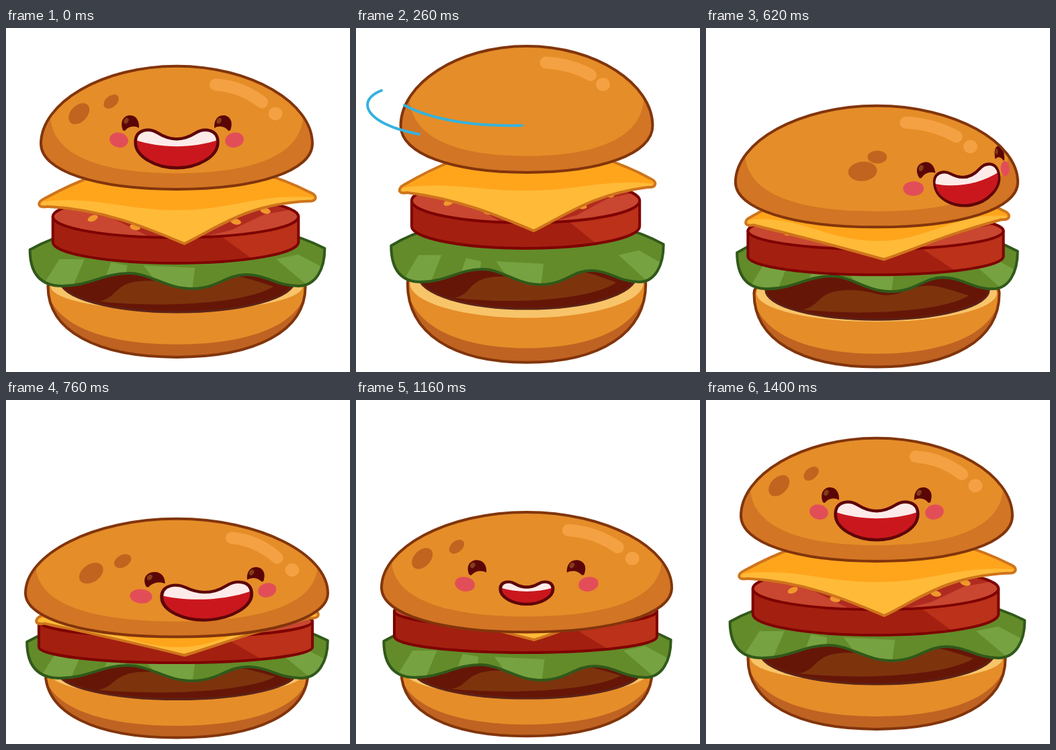
An HTML page with a canvas for the animation above (1.44 s loop, 512 by 512 pixels).

```html
<!DOCTYPE html>
<html lang="en">
<head>
<meta charset="utf-8">
<title>Bouncing burger</title>
<style>
  html, body { margin: 0; width: 100%; height: 100%; overflow: hidden; background: #fff; }
  canvas { display: block; }
</style>
</head>
<body>
<canvas id="stage" width="512" height="512"></canvas>
<script>
const ctx = document.getElementById('stage').getContext('2d');
const LOOP = 1440, STEPS = 42, RAD = Math.PI / 180;

// Key poses of the hop: step (30 per second), half width of the top bun,
// then the lowest point of each layer. All other sizes follow from these.
const FIELDS = ['step', 'spread', 'bun', 'cheese', 'tomato', 'lettuce'];
const POSES = [
  [0, 202, 240, 321, 350, 388],
  [8, 187.5, 215, 302, 328, 382],
  [14, 185.5, 215.5, 297, 334, 361],
  [23, 225, 352.5, 380, 391, 418],
  [30, 197, 320, 375, 386, 416],
  [35, 216, 345.5, 357, 376, 417],
  [37, 231, 353, 366, 385, 422]
].map(row => Object.fromEntries(FIELDS.map((f, i) => [f, row[i]])));

const clamp = (x, lo, hi) => Math.min(hi, Math.max(lo, x));

// Smooth cyclic spline through one field of the poses.
function sample(field, step) {
  const n = POSES.length;
  const pose = i => POSES[(i + n) % n];
  const time = i => pose(i).step + STEPS * Math.floor(i / n);
  const value = i => pose(i)[field];
  const tangent = i => (value(i + 1) - value(i - 1)) / (time(i + 1) - time(i - 1));
  const at = (step + STEPS) % STEPS;
  let i = n - 1;
  while (time(i) > at) i--;
  const span = time(i + 1) - time(i), u = (at - time(i)) / span, v = 1 - u;
  return value(i) * v * v * (1 + 2 * u) + value(i + 1) * u * u * (3 - 2 * u)
    + span * u * v * (tangent(i) * v - tangent(i + 1) * u);
}

// A start point followed by cubic segments, scaled into place.
function curve(x, y, w, h, p) {
  const path = new Path2D(), q = p.map((n, i) => i % 2 ? y + n * h : x + n * w);
  path.moveTo(q[0], q[1]);
  for (let i = 2; i < q.length; i += 6) path.bezierCurveTo(...q.slice(i, i + 6));
  return path;
}

function poly(x, y, w, h, p) {
  const path = new Path2D();
  for (let i = 0; i < p.length; i += 2) path.lineTo(x + p[i] * w, y + p[i + 1] * h);
  path.closePath();
  return path;
}

function oval(x, y, rx, ry, turn = 0) {
  const path = new Path2D();
  path.ellipse(x, y, rx, ry, turn, 0, 7);
  return path;
}

function fill(path, color) {
  ctx.fillStyle = color;
  ctx.fill(path);
}

function stroke(path, color, width = 4) {
  ctx.strokeStyle = color;
  ctx.lineWidth = width;
  ctx.stroke(path);
}

function layer(path, color, line, details, width) {
  fill(path, color);
  ctx.save();
  ctx.clip(path);
  details();
  ctx.restore();
  stroke(path, line, width);
}

function drawBase({ drop, late, speed }) {
  const x = 254, w = 175 + late * .6, mid = 380 + drop * .18, low = 498 + speed * .12;
  const pattyLow = 418 + drop * .2, pattyMid = 370 + drop * .25, pattyW = w * .91;
  const ry = pattyLow + Math.max(-2, 18 - late * 1.2) - mid, h = low - mid;
  const arch = ry / h * 1.33;
  const body = curve(x, mid, w, h, [-1, 0, -1, .63, -.62, 1, 0, 1, .62, 1, 1, .63, 1, 0,
    1, -arch, -1, -arch, -1, 0]);
  layer(body, '#bf6322', '#82350c', () => {
    fill(curve(x, mid, w, h, [-1, .1, -.92, .6, -.5, .82, 0, .82, .5, .82, .92, .6, 1, .1,
      1, -1, -1, -1, -1, .1]), '#e58d29');
    fill(oval(x, mid, w * .98, ry), '#f8c469');
  });
  const r = pattyLow - pattyMid;
  layer(oval(255, pattyMid, pattyW, r), '#661607', '#5c2317', () => {
    fill(curve(255, pattyMid, pattyW, r, [-.67, .66, -.5, .55, -.55, 0, -.25, 0, 0, 0, 0, .3, .2, .1,
      .45, -.3, .5, -.2, .82, .18, .6, .7, -.1, .88, -.67, .66]), '#7d340d');
  }, 3);
}

function drawLettuce({ late, lettuce: trough }) {
  const x = 255, w = 200 + late * .7;
  const tip = trough - 59, lobe = trough - 4, crest = trough - 23;
  const leaf = curve(x, 0, w, 1, [-1, tip + 1,
    -1, tip + 36, -.93, lobe, -.78, lobe,
    -.6, lobe, -.5, crest, -.33, crest,
    -.18, crest, -.08, trough, .1, trough,
    .27, trough, .33, crest + 2, .47, crest + 2,
    .6, crest + 2, .68, lobe, .82, lobe,
    .94, lobe, 1, tip + 30, 1, tip - 1,
    .85, tip - 18, .6, tip - 40, 0, tip - 40,
    -.6, tip - 40, -.85, tip - 18, -1, tip + 1]);
  layer(leaf, '#638b29', '#30591a', () => {
    for (const p of [
      [-.8, 0, -.63, 0, -.72, 1, -.92, .9],
      [-.45, .1, -.34, .2, -.36, 1, -.52, 1],
      [-.23, .2, .12, .28, .1, 1, -.1, 1],
      [.67, 0, .82, -.15, 1, .3, .92, 1]
    ]) fill(poly(x, trough - 44, w, 46, p), '#76a241');
  });
}

function drawTomato({ spread, drop, tomato: low }) {
  const x = 252.5, w = spread * .905, ry = 33 - drop * .07, h = 38;
  const y = low - ry - h, line = '#7d0202';
  const body = new Path2D();
  body.ellipse(x, y + h, w, ry, 0, 0, Math.PI);
  body.ellipse(x, y, w, ry, 0, Math.PI, 2 * Math.PI);
  body.closePath();
  layer(body, '#a31f10', line, () => {
    fill(poly(x, y, w, ry + h, [.36, .4, .67, 1, 1.1, 1, 1.1, 0]), '#bb3119');
  });
  layer(oval(x, y, w, ry), '#b02b1f', line, () => {
    for (const p of [
      [-1, -.3, -.75, -.6, -.2, 1, -.65, 1, -1, .4],
      [.2, 1, .45, .65, .72, -.1, 1, -.4, 1, .6]
    ]) fill(poly(x, y, w, ry, p), '#c94730');
    for (const [u, v, turn] of [[-.675, .08, -.4], [-.33, .5, .2], [.49, .24, .2], [.73, -.28, .25]])
      fill(oval(x + u * w, y + v * ry, 8, 4.3, turn), '#f0982d');
  });
}

function drawCheese({ late, drop, speed, cheese: low }) {
  const x = 255, w = 188 + late * .65, tip = low - 66 + drop * .07;
  const sag = clamp(.35 - speed * .03, 0, .6);
  const l = tip + 4, r = tip - 5, mid = low - Math.max(12, 60 - drop * .4);
  const near = y => y + (low - y) * (.45 - .5 * sag);
  const far = y => low - (low - y) * (.25 + .18 * sag);
  const slice = curve(x, 0, w, 1, [-.96, l - 7,
    -1.015, l - 2, -1.015, l + 8, -.94, l + 5,
    -.52, near(l), -.2, far(l), .05, low,
    .3, far(r), .5, near(r), .94, r + 6,
    1.015, r + 7, 1.015, r - 3, .96, r - 7,
    .8, r - 24, .4, tip - 62, 0, tip - 62,
    -.4, tip - 62, -.8, l - 25, -.96, l - 7]);
  layer(slice, '#ffa51c', '#cf741c', () => {
    fill(curve(x, 0, w, 1, [-1, tip + 2, -.6, tip - 8, -.4, mid, 0, mid,
      .4, mid, .6, tip - 12, 1, tip - 4, 1, low + 40, -1, low + 40, -1, tip + 2]), '#ffba38');
  });
}

function drawMouth(w, h) {
  const lips = curve(0, 0, w, h, [-.99, -.2, -.98, -.55, -.65, -.57, -.45, -.43,
    -.15, -.22, .15, -.22, .45, -.43, .65, -.57, .98, -.55, .99, -.2,
    1, .2, .5, .5, 0, .5, -.5, .5, -1, .2, -.99, -.2]);
  layer(lips, '#ca171e', '#5e0508', () => {
    fill(curve(0, 0, w, h, [-1, -.25, -.4, -.02, .4, -.02, 1, -.25,
      1, -1, -1, -1, -1, -.25]), '#fdebe9');
  }, 4.5);
}

function drawEye(side) {
  fill(curve(0, 0, side, 1, [-11, 10, -16, -4, -9, -12, 0, -12,
    9, -12, 14, -3, 13, 7, 6, 3, -2, 4, -8, 11, -9, 11, -10, 11, -11, 10]), '#5b0606');
  fill(oval(-6, -4, 3.3, 4.6, .5), '#843d16');
}

function drawTop({ step, spread: w, bun }) {
  const x = 254, h = 188.5 - (w - 186) * .33, top = bun - h;
  const turn = Math.min(1, step / 27);
  const spin = -360 * (1 - (1 - turn) ** 1.8);
  const nod = .08 * Math.sin(Math.PI * turn);
  const tilt = -Math.atan2(Math.sin(spin * RAD), Math.cos(spin * RAD)) * .25;
  const sway = Math.min(2, (step / 21) ** 1.6);
  const shine = -1.1 * Math.sin(Math.PI * sway) * (1 - sway / 4);
  const smirk = Math.sin(Math.PI * clamp((step - 25) / 17, 0, 1));
  const at = (u, v) => [x + u * w, top + v * h];

  // Places a drawing on the spinning dome at a longitude and height.
  function feature(angle, v, draw, radius = 1) {
    const a = (angle + spin) * RAD, front = Math.cos(a), rest = Math.cos(angle * RAD);
    if (front < .03) return;
    ctx.save();
    ctx.translate(...at(radius * Math.sin(a), v + nod + .3 * (front - rest)));
    draw(a, front, rest);
    ctx.restore();
  }

  function facing(angle, v, draw) {
    feature(angle, v, (a, front, rest) => {
      ctx.rotate(tilt);
      ctx.scale(w / 202 * front / rest, h / 184);
      draw();
    });
  }

  function spot(angle, v, rx, ry, radius) {
    feature(angle, v, (a, front) => {
      const size = .6 + .6 * front;
      fill(oval(0, 0, rx * size, ry * size, a), '#c06420');
    }, radius);
  }

  const dome = curve(x, top, w, h, [-1, .63, -1, .3, -.55, 0, 0, 0, .55, 0, 1, .3, 1, .63,
    1, .85, .6, 1, 0, 1, -.6, 1, -1, .85, -1, .63]);
  layer(dome, '#d27524', '#82350c', () => {
    fill(curve(x, top, w, h, [-.93, .35, -.96, .73, -.55, .87, 0, .87, .55, .87, .96, .73, .93, .35,
      1, -.4, -1, -.4, -.93, .35]), '#e58d28');

    const slide = .13 * shine - .09 * shine * shine;
    const [x1, y1] = at(.287 + .207 * shine, .15 + .03 * shine);
    const [x2, y2] = at(.629 + slide, .293 + .1 * shine);
    const glow = new Path2D();
    glow.moveTo(x1, y1);
    glow.quadraticCurveTo(x1 + (x2 - x1) * .55, y1 + (y2 - y1) * .1, x2, y2);
    stroke(glow, '#f4a143', 18);
    fill(oval(...at(.728 + slide, .386 + .128 * shine), 10.5, 10), '#f4a143');

    spot(-46, .386, 18, 12, 1);
    spot(-40, .288, 12, 8, .75);
    for (const side of [-1, 1]) {
      facing(25.2 * side, .6, () => fill(oval(0, 0, 14, 11, -.25 * side), '#e24e58'));
      facing(20 * side, .465, () => drawEye(-side));
    }
    facing(0, .675, () => drawMouth(62 - 26 * smirk, 56 - 23 * smirk));
  });
}

// Part of a cubic between two parameters, drawn as a short polyline.
function streak(p, from, to) {
  const path = new Path2D();
  for (let i = 0; i <= 30; i++) {
    const t = from + (to - from) * i / 30, s = 1 - t;
    const axis = k => s * s * s * p[k] + 3 * s * s * t * p[k + 2] + 3 * s * t * t * p[k + 4] + t * t * t * p[k + 6];
    path.lineTo(axis(0), axis(1));
  }
  stroke(path, '#35b2de');
}

function drawStreaks({ step }) {
  const head = Math.min(1, (step - 5) / 3), tail = Math.max(0, (step - 8) / 3);
  if (head <= 0 || tail >= 1) return;
  streak([247, 145, 170, 147, 110, 135, 72, 115], tail, head);
  streak([94, 158, 13, 143, -1, 108, 38, 93], tail, head);
}

function frame(now) {
  const time = Math.max(0, now - start) % LOOP;
  const step = Math.min(STEPS, Math.floor((time + 19.9) * .03)) % STEPS;
  const state = Object.fromEntries(FIELDS.map(f => [f, sample(f, step)]));
  state.step = step;
  state.drop = state.bun - 215;
  state.speed = state.bun - sample('bun', step - 3);
  state.late = sample('spread', step - 2) - 186; // lower layers widen a little later

  ctx.fillStyle = '#fff';
  ctx.fillRect(0, 0, 512, 512);
  ctx.lineJoin = ctx.lineCap = 'round';
  for (const draw of [drawBase, drawLettuce, drawTomato, drawCheese, drawTop, drawStreaks]) draw(state);
  requestAnimationFrame(frame);
}

const start = performance.now();
frame(start);
</script>
</body>
</html>
```
